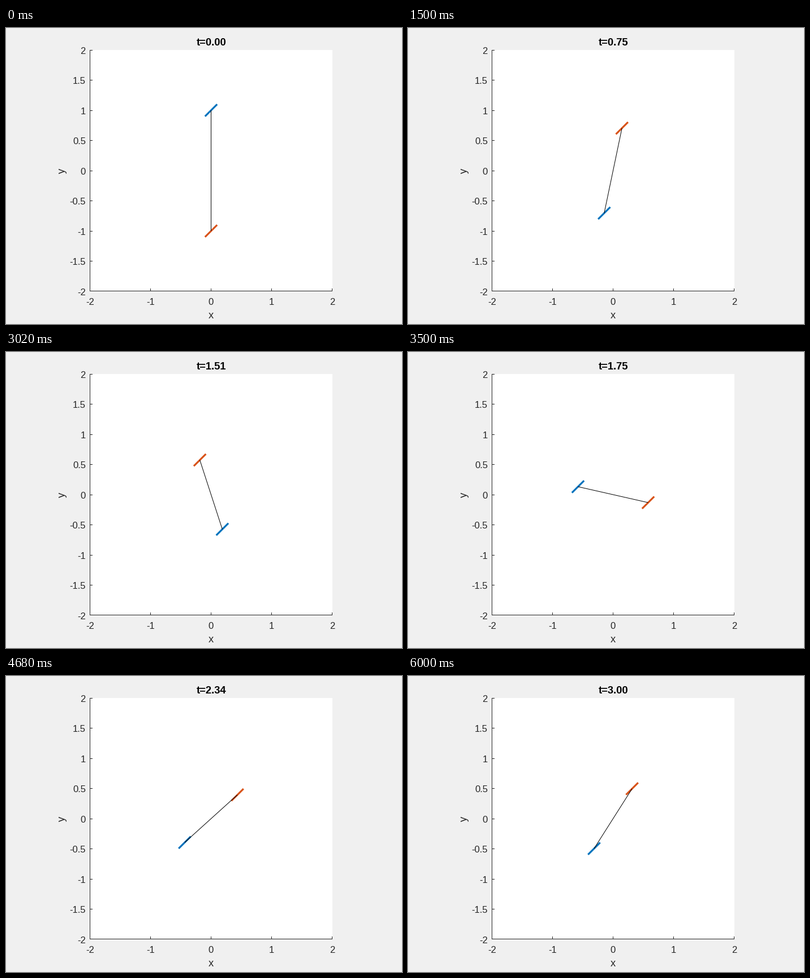
Write a matplotlib script that moves like this. It is 700 px wide and 525 px high and loops after 6.02 s.

```python
import numpy as np
import matplotlib.pyplot as plt
from matplotlib.animation import FuncAnimation

W, H, DPI = 700, 525, 100
FRAMES, INTERVAL, DT = 301, 20, 0.01
CX, CY, UNIT = 362.5, 253, 107
INK = "#262626"

plt.rcParams["font.family"] = "Liberation Sans"


def pt(px):
    return px * 72 / DPI


def radius(t):
    """Half length of the tether: steady reel-in that settles at r_end."""
    r_end, soft, rate = 0.5868, 0.132, 3.385
    start = np.expm1((1 - r_end) / soft)
    return r_end + soft * np.log1p(start * np.exp(-rate * t))


# Angular momentum is conserved, so the spin rate is pi / r^2.
SUB = 10
fine = np.arange((FRAMES - 1) * SUB + 1) * DT / SUB
spin = np.pi / radius(fine) ** 2
steps = (spin[1:] + spin[:-1]) / 2 * DT / SUB
angle = np.concatenate([[0], np.cumsum(steps)])[::SUB]

fig = plt.figure(figsize=(W / DPI, H / DPI), dpi=DPI, facecolor="#f0f0f0")
ax = fig.add_axes([0, 0, 1, 1])
ax.set_xlim(0, W)
ax.set_ylim(H, 0)
ax.axis("off")


def label(x, y, text, px, ha="center", color=INK, **kw):
    return ax.text(x, y, text, fontsize=pt(px), ha=ha, va="baseline",
                   color=color, **kw)


def line(xs, ys, color=INK, px=1, z=2):
    # Coordinates already sit on pixel centres, so snapping is off.
    return ax.plot(xs, ys, color=color, lw=pt(px), zorder=z,
                   solid_capstyle="butt", snap=False)[0]


# Plot area, axis lines, ticks
ax.add_patch(plt.Rectangle((148, 39), 429, 428, fc="white", lw=0, zorder=0))
line([148, 577], [466.5, 466.5])
line([148.5, 148.5], [39, 467])
for v in range(-2, 3):
    x = CX + v * UNIT
    line([x, x], [462, 467])
    label(x, 491, f"{v}", 16.67)
for v in np.arange(-2, 2.5, 0.5):
    y = CY - v * UNIT
    row = min(np.floor(y), 466) + 0.5
    line([148, 153], [row, row])
    label(141, y + 6.6, f"{v:g}", 16.67, ha="right")
label(CX, 515, "x", 18.33)
label(104, CY + 0.5, "y", 18.33, rotation=90, rotation_mode="anchor")

title = label(CX + 0.5, 31, "", 18.33, color="black", weight="bold")
blue = line([], [], "#0072BD", 3.2, 3)
orange = line([], [], "#D95319", 3.2, 3)
tether = line([], [], "black", 1, 4)
DASH = np.array([-0.1, 0.1]) * UNIT


def update(i):
    t = i * DT
    r = radius(t) * UNIT
    dx, dy = r * np.sin(angle[i]), -r * np.cos(angle[i])
    blue.set_data(CX + dx + DASH, CY + dy - DASH)
    orange.set_data(CX - dx + DASH, CY - dy - DASH)
    tether.set_data([CX - dx, CX + dx], [CY - dy, CY + dy])
    title.set_text(f"t={t:.2f}")
    return blue, orange, tether, title


anim = FuncAnimation(fig, update, frames=FRAMES, interval=INTERVAL,
                     repeat=True, repeat_delay=0, blit=False)
plt.show()
```
